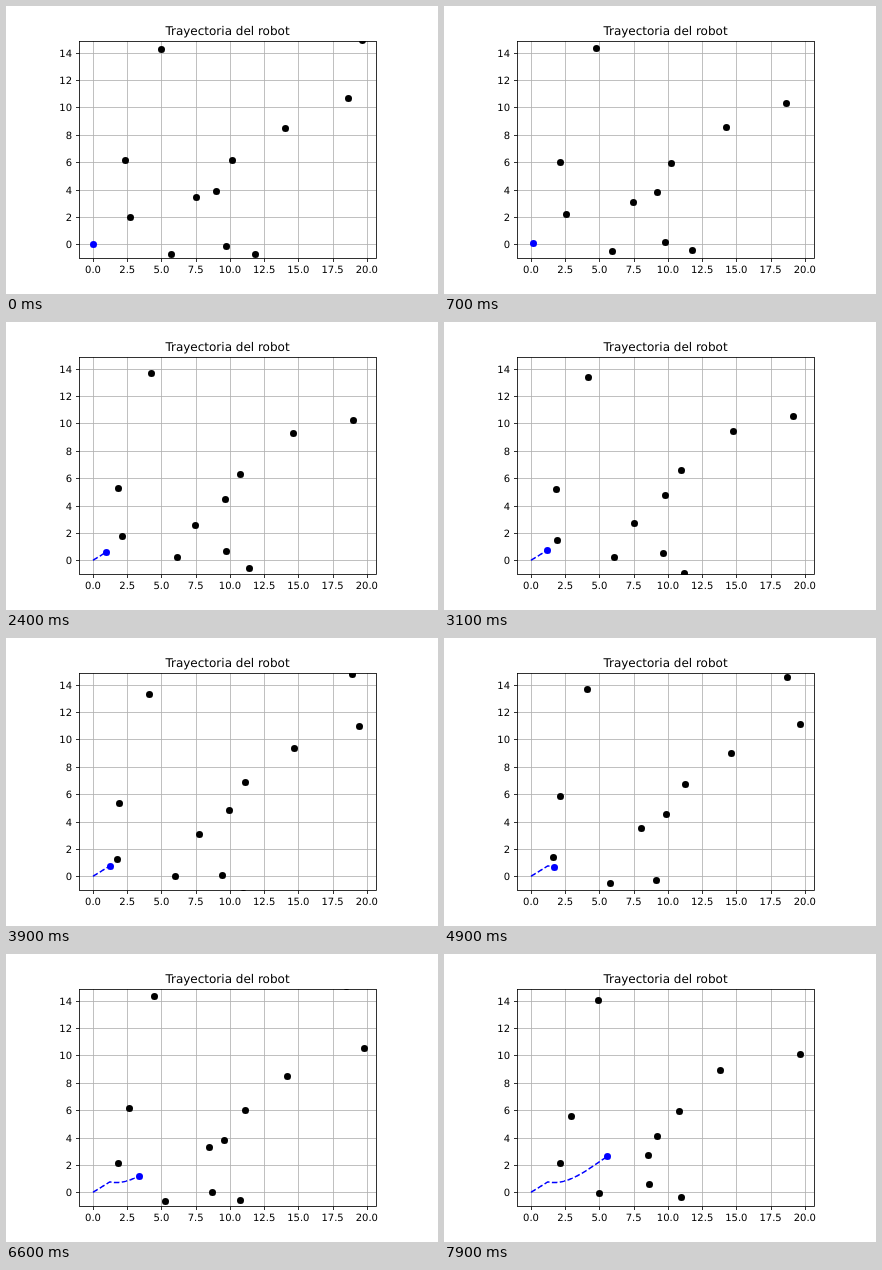
Recreate the animation shown at these times as an HTML page. Size 432x288 px, loop 8000 ms.

```html
<!DOCTYPE html>
<html lang="es">
<head>
<meta charset="utf-8">
<title>Trayectoria del robot</title>
<style>
  html, body { margin: 0; width: 100%; height: 100%; overflow: hidden; background: #fff; }
  svg { display: block; width: 432px; height: 288px; }
  text { font: 10px "DejaVu Sans", sans-serif; text-anchor: middle; text-rendering: geometricPrecision; }
  .title { font-size: 12px; }
  .ylab { text-anchor: end; }
  .grid { stroke: #b0b0b0; stroke-width: .8; }
  .tick, .frame { stroke: #000; stroke-width: .8; fill: none; }
  .trail { fill: none; stroke: #00f; stroke-width: 1.5; stroke-dasharray: 5.55 2.4; stroke-linejoin: round; }
</style>
</head>
<body>
<svg viewBox="0 0 432 288">
  <clipPath id="area"><rect x="73" y="35" width="298" height="218"/></clipPath>
  <g id="axes"></g>
  <g id="plot" clip-path="url(#area)"></g>
  <rect class="frame" x="73.5" y="35.5" width="297" height="217"/>
  <text class="title" x="221.5" y="29">Trayectoria del robot</text>
</svg>
<script>
const STEP = 100, STEPS = 80;
const TURN = 35; // step at which the robot reaches its corner

// obstacle centres, in order of phase
const centres = [
  [5.52, -.23], [9.23, .18], [19.07, 15.03], [11.28, -.83],
  [2.24, 1.72], [4.67, 13.83], [2.43, 5.68], [7.97, 3.08],
  [19.23, 10.63], [10.64, 6.39], [9.31, 4.34], [14.13, 8.98]
];

const toX = x => 87 + 13.69 * x;
const toY = y => 238.3 - 13.69 * y;
const snap = v => Math.round(v) + .5;

function add(parent, name, attrs, label) {
  const el = document.createElementNS("http://www.w3.org/2000/svg", name);
  for (const key in attrs) el.setAttribute(key, attrs[key]);
  if (label !== undefined) el.textContent = label;
  return parent.appendChild(el);
}

const axes = document.getElementById("axes");
const plot = document.getElementById("plot");

for (let v = 0; v <= 20; v += 2.5) {
  const x = snap(toX(v));
  add(axes, "path", { class: "grid", d: `M${x} 35V252` });
  add(axes, "path", { class: "tick", d: `M${x} 252.5v3.5` });
  add(axes, "text", { x: toX(v), y: 267 }, v.toFixed(1));
}
for (let v = 0; v <= 14; v += 2) {
  const y = snap(toY(v));
  add(axes, "path", { class: "grid", d: `M73 ${y}H370` });
  add(axes, "path", { class: "tick", d: `M73.5 ${y}h-3.5` });
  add(axes, "text", { class: "ylab", x: 66, y: y + 3.5 }, v);
}

const dot = fill => add(plot, "circle", { r: 3.5, fill });
const dots = centres.map(() => dot("#000"));
const trail = add(plot, "path", { class: "trail" });
const robot = dot("#00f");

function place(el, [x, y]) {
  el.setAttribute("cx", snap(toX(x)));
  el.setAttribute("cy", snap(toY(y)));
}

// phases spread around the circle, slightly bunched
const phase = i => .54 * (i - 5.5) + .2 * Math.cos((i - 1) * Math.PI / 4);

function obstacleAt([x, y], i, n) {
  return [x - .6 * Math.sin(.05 * n + phase(i)), y + .5 * Math.cos(.1 * n + phase(i))];
}

// eased straight leg to the corner, then steady acceleration along a curve
function robotAt(n) {
  const u = Math.min(n / TURN, 1), ease = u * u * (3 - 2 * u);
  const far = .00225 * Math.max(n - TURN, 0) ** 2;
  return [1.23 * ease + far, .76 * ease + far * (-.2 + far * (.232 - .02 * far))];
}

const path = Array.from({ length: STEPS }, (_, n) => robotAt(n));

function draw(n) {
  centres.forEach((c, i) => place(dots[i], obstacleAt(c, i, n)));
  trail.setAttribute("d", "M" + path.slice(0, n + 1).map(([x, y]) => `${toX(x)} ${toY(y)}`).join("L"));
  place(robot, path[n]);
}

const start = performance.now();
let shown = 0;
draw(0);
function tick() {
  const n = Math.floor((performance.now() - start) / STEP) % STEPS;
  if (n !== shown) draw(shown = n);
  requestAnimationFrame(tick);
}
requestAnimationFrame(tick);
</script>
</body>
</html>
```
